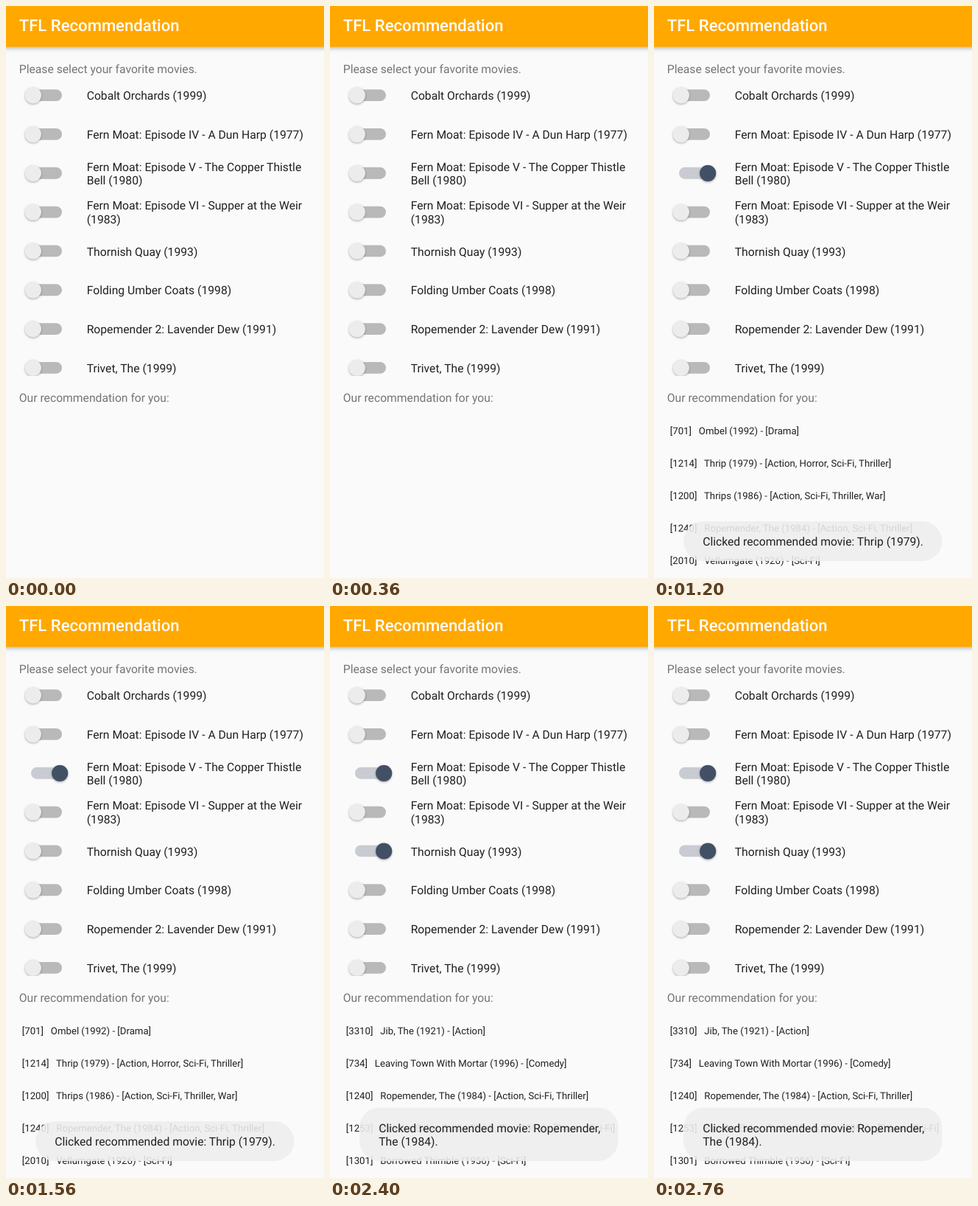
Write an HTML page with a canvas that moves like this. It is 432x776 px and loops after 3 s.

```html
<!DOCTYPE html>
<html lang="en">
<head>
<meta charset="utf-8">
<title>TFL Recommendation</title>
<style>
  html, body { margin: 0; width: 100%; height: 100%; overflow: hidden; background: #fafafa; }
  canvas { display: block; width: 432px; height: 776px; }
</style>
</head>
<body>
<canvas id="stage"></canvas>
<script>
const W = 432, H = 776, STEP = 600;
const INK = '#202020', MUTED = '#757575', ACCENT = '#425066';

const canvas = document.getElementById('stage');
const ratio = window.devicePixelRatio || 1;
canvas.width = W * ratio;
canvas.height = H * ratio;
const ctx = canvas.getContext('2d');

const movies = [
  ['Cobalt Orchards (1999)'],
  ['Fern Moat: Episode IV - A Dun Harp (1977)'],
  ['Fern Moat: Episode V - The Copper Thistle', 'Bell (1980)'],
  ['Fern Moat: Episode VI - Supper at the Weir', '(1983)'],
  ['Thornish Quay (1993)'],
  ['Folding Umber Coats (1998)'],
  ['Ropemender 2: Lavender Dew (1991)'],
  ['Trivet, The (1999)']
];

const firstPicks = [
  '[701]   Ombel (1992) - [Drama]',
  '[1214]   Thrip (1979) - [Action, Horror, Sci-Fi, Thriller]',
  '[1200]   Thrips (1986) - [Action, Sci-Fi, Thriller, War]',
  '[1240]   Ropemender, The (1984) - [Action, Sci-Fi, Thriller]',
  '[2010]   Vellumgate (1926) - [Sci-Fi]'
];
const secondPicks = [
  '[3310]   Jib, The (1921) - [Action]',
  '[734]   Leaving Town With Mortar (1996) - [Comedy]',
  '[1240]   Ropemender, The (1984) - [Action, Sci-Fi, Thriller]',
  '[1253]   Elm the Baker Could Climb, The (1951) - [Drama, Sci-Fi]',
  '[1301]   Borrowed Thimble (1956) - [Sci-Fi]'
];

const states = [
  { on: [], picks: [] },
  { on: [2], picks: firstPicks },
  { on: [2], picks: firstPicks, toast: ['Clicked recommended movie: Thrip (1979).'] },
  { on: [2, 4], picks: secondPicks },
  { on: [2, 4], picks: secondPicks, toast: ['Clicked recommended movie: Ropemender,', 'The (1984).'] }
];

function text(str, x, y, size = 15.7, color = INK, weight = 400) {
  ctx.font = `${weight} ${size}px Roboto, sans-serif`;
  ctx.fillStyle = color;
  ctx.fillText(str, x, y);
}

function pill(x, y, w, h, r, color) {
  ctx.fillStyle = color;
  ctx.beginPath();
  ctx.roundRect(x, y, w, h, r);
  ctx.fill();
}

function setShadow(alpha, blur, dy) {
  ctx.shadowColor = `rgba(0,0,0,${alpha})`;
  ctx.shadowBlur = blur * ratio;
  ctx.shadowOffsetY = dy * ratio;
}

function drawHeader() {
  ctx.save();
  setShadow(0.24, 5, 2);
  ctx.fillStyle = '#ffa800';
  ctx.fillRect(-10, -10, W + 20, 65.5);
  ctx.restore();
  text('TFL Recommendation', 17.8, 34.4, 22.1, '#fff', 500);
}

function drawSwitch(y, on) {
  pill(34, y - 8, 42, 15.8, 7.9, on ? '#c8cbd1' : '#b9b9b9');
  ctx.save();
  ctx.beginPath();
  ctx.rect(0, 0, W, 501.8);
  ctx.clip();
  setShadow(0.3, 3, 1.2);
  ctx.fillStyle = on ? ACCENT : '#ececec';
  ctx.beginPath();
  ctx.arc(on ? 73.2 : 36.8, y, 11.1, 0, Math.PI * 2);
  ctx.fill();
  ctx.restore();
}

function drawMovie(lines, index, on) {
  const y = 121.2 + index * 52.83;
  drawSwitch(y, on);
  lines.forEach((line, i) => {
    const offset = (i - (lines.length - 1) / 2) * 18.5;
    text(line, 109.7, y + 6 + offset);
  });
}

function drawToast(lines) {
  const height = 35.5 + lines.length * 18.5;
  pill(40, 753 - height, 351.5, height, 27, 'rgba(238,238,238,0.88)');
  lines.forEach((line, i) => text(line, 66.2, 732.4 - (lines.length - 1 - i) * 18.5));
}

function draw(now) {
  const state = states[Math.floor(now / STEP) % states.length];
  ctx.setTransform(ratio, 0, 0, ratio, 0, 0);
  ctx.textRendering = 'geometricPrecision';
  ctx.fillStyle = '#fafafa';
  ctx.fillRect(0, 0, W, H);
  drawHeader();
  text('Please select your favorite movies.', 17.8, 90.8, 15.7, MUTED);
  movies.forEach((lines, i) => drawMovie(lines, i, state.on.includes(i)));
  text('Our recommendation for you:', 17.8, 536.8, 15.7, MUTED);
  state.picks.forEach((pick, i) => text(pick, 21.8, 580.6 + i * 44, 13.2));
  if (state.toast) drawToast(state.toast);
}

let start;
function tick(now) {
  start ??= now;
  draw(now - start);
  requestAnimationFrame(tick);
}
requestAnimationFrame(tick);
</script>
</body>
</html>
```
